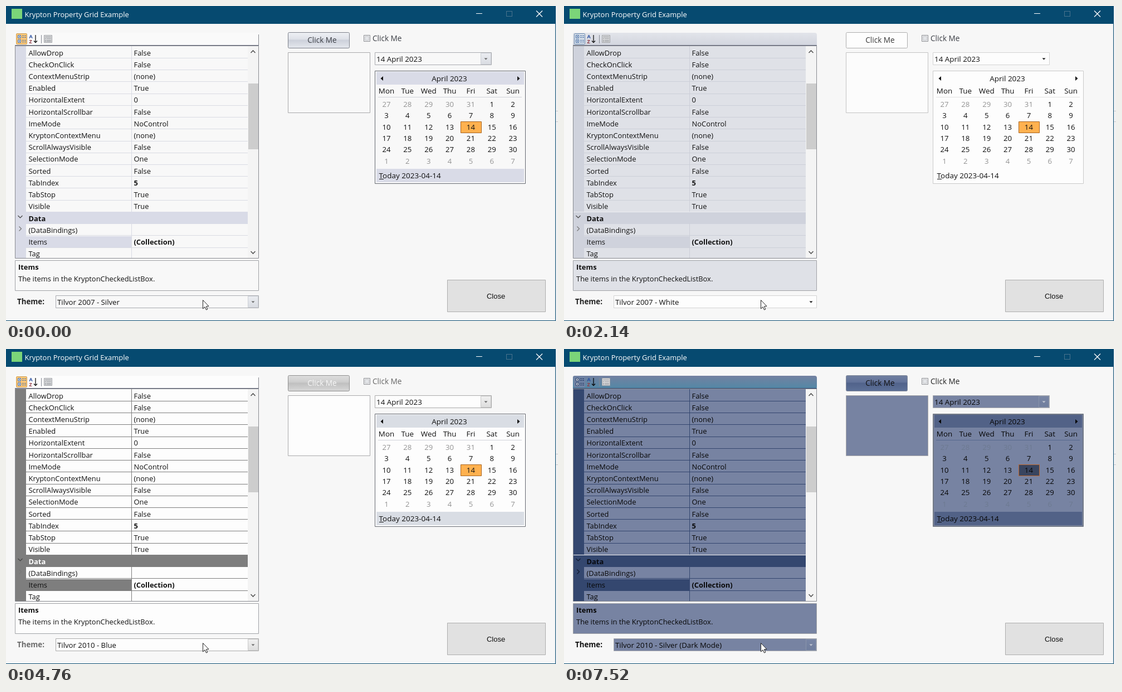
These frames come from a looping animation (991 px wide and 565 px high, 8000 ms). An HTML page with a canvas:

```html
<!DOCTYPE html>
<html lang="en">
<head>
<meta charset="utf-8">
<title>Property Grid Example</title>
<style>
html, body { margin: 0; width: 100%; height: 100%; overflow: hidden; background: #f7f7f7; }
canvas { display: block; width: 991px; height: 565px; }
</style>
</head>
<body>
<canvas id="stage" width="991" height="565"></canvas>
<script>
const ctx = document.getElementById('stage').getContext('2d');
const LOOP = 8000;
const UI = '"Open Sans", "Noto Sans", sans-serif';

// Themes: each one starts from a related theme and overrides what differs.
const silver = {
  bg: '#f8f8f8', line: '#d9dbe3', cat: '#d9dbe7', catLine: '#d9dbe7', text: '#111', catText: '#111', arrow: '#444',
  bar: ['#fafafa', '#fafafa'], flatBar: true, barLine: '#666b7d', iconBg: '#ffc877', iconEdge: '#c79a55', glyph: '#3b659f',
  list: '#f8f8f8', listEdge: '#a9a9ab', combo: '#f8f8f8', comboEdge: '#a9abb0', comboText: '#111',
  drop: ['#eceef2', '#d8dbe1'], dropEdge: '#cdd0d6', dropArrow: '#666',
  button: ['#eff1f5', '#dfe2e9', '#cdd1db', '#e5e8ee'], buttonEdge: '#7d818b', buttonText: '#3b3e45',
  cal: '#f8f8f8', calHead: '#d9dbe7', calEdge: '#666a72', calText: '#111', calDim: '#939393', calLine: '#d0d2d8',
  pick: '#ffb14f', pickEdge: '#a96521', label: '#222', check: '#3b3e45'
};
const silverDark = { ...silver,
  bg: '#7783a2', line: '#34466f', cat: '#34476f', catLine: '#f4f4f4', text: '#070707', catText: '#080a10', arrow: '#111a30',
  bar: ['#7d88a7', '#737f9f'], flatBar: false, barLine: '#34466f', iconBg: '#5288d8', iconEdge: '#2c5598', glyph: '#20355f',
  list: '#7783a2', combo: '#7783a2', comboText: '#070707', drop: ['#a8b3cb', '#687da8'], dropEdge: '#9aa5bd', dropArrow: '#eee',
  button: ['#c9d0df', '#8f9bb6', '#53658d', '#929fbb'], buttonText: '#111', check: '#222',
  cal: '#7783a2', calHead: '#526287', calEdge: '#737a88', calText: '#070707', calDim: '#6d7a91', calLine: '#56678e',
  pick: '#39455f', pickEdge: '#bd672d', label: '#111'
};
const silverLight = { ...silver,
  bg: '#dfe1e7', line: '#cccfd8', cat: '#cfd2dc', catLine: '#edeef2', bar: ['#e2e4ea', '#d2d5de'], flatBar: false,
  iconBg: '#d4dde8', iconEdge: '#6c8bb0', list: '#dfe1e7', combo: '#dfe1e7', cal: '#dfe1e7', calHead: '#cfd2dc'
};
const whiteStart = { ...silverLight,
  list: '#fcfcfc', listEdge: '#c3c3c3', combo: '#fdfdfd', comboEdge: '#d3d3d3', drop: ['#fdfdfd', '#fdfdfd'], dropEdge: '#fdfdfd', dropArrow: '#111',
  button: ['#fdfdfd', '#fdfdfd', '#fdfdfd', '#fdfdfd'], buttonEdge: '#adadad', buttonText: '#3a3a3a',
  cal: '#fdfdfd', calHead: '#fdfdfd', calEdge: '#c9c9c9', calLine: '#e3e3e3'
};
const white = { ...whiteStart, bg: '#fdfdfd', line: '#e1e2e7' };
const blackLight = { ...silver,
  bg: '#fdfdfd', line: '#7e7e7e', cat: '#7e7e7e', catLine: '#7e7e7e', catText: '#fff', bar: ['#fdfdfd', '#fdfdfd'],
  list: '#fdfdfd', combo: '#fdfdfd', comboEdge: '#ababab', drop: ['#f2f2f2', '#dcdcdc'], dropEdge: '#c9c9c9',
  button: ['#dedede', '#cecece', '#c0c0c0', '#d8d8d8'], buttonEdge: '#909090', buttonText: '#f8f8f8',
  cal: '#fdfdfd', calHead: '#d9dde4', label: '#6b6b6b', check: '#666'
};
const black = { ...blackLight,
  bar: ['#e2e4e7', '#b7bbc1'], flatBar: false, buttonText: '#333', buttonEdge: '#777', comboEdge: '#898989', label: '#464646'
};
const blackDark = { ...black,
  bg: '#090909', line: '#292929', cat: '#222', catLine: '#eee', text: '#f7f7f7', catText: '#fff', arrow: '#050505',
  bar: ['#0b0b0b', '#060606'], barLine: '#777', iconBg: '#171b23', iconEdge: '#7890af', glyph: '#b9d2ef',
  list: '#090909', combo: '#090909', comboText: '#f7f7f7', drop: ['#a8a8a8', '#333'], dropEdge: '#747474', dropArrow: '#aaa',
  button: ['#b2b2b2', '#555', '#090909', '#555'], buttonText: '#f7f7f7',
  cal: '#090909', calHead: '#282929', calEdge: '#0b0b0b', calText: '#f7f7f7', calDim: '#515151', calLine: '#343434',
  pick: '#090909', pickEdge: '#ba5b1b', label: '#fff', check: '#fff'
};
const blueLight = { ...silver,
  bg: '#e6eefa', line: '#a8c7ea', cat: '#a8c8ea', catLine: '#edf4fc', text: '#1010e8', catText: '#173985',
  bar: ['#d1e3f7', '#8db7e3'], flatBar: false, barLine: '#7591b3', iconBg: '#d4e3f3', iconEdge: '#587da9',
  list: '#e6eefa', combo: '#e6eefa', comboEdge: '#b1c0d6', comboText: '#1010e8', drop: ['#e6eefa', '#dce8f6'], dropEdge: '#b6c8de', dropArrow: '#8c9cb0',
  button: ['#dce9f8', '#d4e4f5', '#cadef3', '#d9e8f9'], buttonEdge: '#a4b9d4', buttonText: '#1e395b',
  cal: '#e6eefa', calHead: '#d1e2f5', calEdge: '#6f98cc', calLine: '#bcd2eb', pick: '#b4d0ed', pickEdge: '#b86b3a',
  label: '#1e2b45', check: '#1e395b'
};
const blue = { ...blueLight, bg: '#fdfdfd', text: '#111', comboText: '#111', list: '#fdfdfd', combo: '#fdfdfd', cal: '#fdfdfd', pick: '#ffb14f' };
const blueStart = { ...blue, line: '#7e7e7e', cat: '#7e7e7e' };
const silver10 = { ...silver, button: ['#fafbfc', '#f0f2f5', '#e5e8ed', '#eff1f4'], buttonEdge: '#a7abb2', drop: ['#f8f8f8', '#eceef1'] };
const silver10Dark = { ...silverDark,
  bar: ['#7381a1', '#5288a6'], iconBg: '#6f82a4', iconEdge: '#6f82a4',
  drop: ['#7986a5', '#6f7d9d'], dropEdge: '#8a94aa', dropArrow: '#c5cad5',
  button: ['#7180a0', '#63739a', '#51638b', '#5d7097'], buttonEdge: '#858c9b'
};
const blueDark = { ...silver10Dark, comboEdge: '#b1c0d6' };

const a = 'Tilvor 2007 - ', b = 'Tilvor 2010 - ', dark = ' (Dark Mode)', light = ' (Light Mode)';
// The chosen label changes first, the colours follow.
const steps = [
  [0, silver, a + 'Silver'],
  [730, silver, a + 'Silver' + dark], [800, silverDark, a + 'Silver' + dark],
  [1460, silverLight, a + 'Silver' + light],
  [2140, whiteStart, a + 'White'], [2210, white, a + 'White'],
  [2810, white, a + 'Black'], [2880, black, a + 'Black'],
  [3480, black, a + 'Black' + dark], [3550, blackDark, a + 'Black' + dark],
  [4150, blackDark, a + 'Black' + light], [4220, blackLight, a + 'Black' + light],
  [4760, blackLight, b + 'Blue'], [4830, blueStart, b + 'Blue'], [4900, blue, b + 'Blue'],
  [5430, blue, b + 'Blue' + dark], [5500, blueDark, b + 'Blue' + dark],
  [6100, blueDark, b + 'Blue' + light], [6170, blueLight, b + 'Blue' + light],
  [6780, blueLight, b + 'Silver'], [6850, silver10, b + 'Silver'],
  [7450, silver10, b + 'Silver' + dark], [7520, silver10Dark, b + 'Silver' + dark]
];

const rows = `AllowDrop|False
CheckOnClick|False
ContextMenuStrip|(none)
Enabled|True
HorizontalExtent|0
HorizontalScrollbar|False
ImeMode|NoControl
KryptonContextMenu|(none)
ScrollAlwaysVisible|False
SelectionMode|One
Sorted|False
TabIndex|5
TabStop|True
Visible|True
Data|
(DataBindings)|
Items|(Collection)
Tag|`.split('\n').map(r => r.split('|'));

function rect(x, y, w, h, fill) {
  ctx.fillStyle = fill;
  ctx.fillRect(x, y, w, h);
}
function box(x, y, w, h, fill, edge, r = 0) {
  ctx.beginPath();
  ctx.roundRect(x + .5, y + .5, w - 1, h - 1, r);
  ctx.fillStyle = fill;
  ctx.fill();
  ctx.strokeStyle = edge;
  ctx.lineWidth = 1;
  ctx.stroke();
}
function shade(y, h, colors, stops) {
  const g = ctx.createLinearGradient(0, y, 0, y + h);
  colors.forEach((c, i) => g.addColorStop(stops ? stops[i] : i / (colors.length - 1), c));
  return g;
}
function text(s, x, y, color, size = 12.9, { bold = false, align = 'left', family = UI } = {}) {
  ctx.font = `${bold ? 700 : 400} ${size}px ${family}`;
  ctx.textAlign = align;
  ctx.fillStyle = color;
  ctx.fillText(s, x, y);
}
function path(points, stroke, width = 1, fill) {
  ctx.beginPath();
  points.forEach(([x, y], i) => i ? ctx.lineTo(x, y) : ctx.moveTo(x, y));
  if (fill) {
    ctx.closePath();
    ctx.fillStyle = fill;
    ctx.fill();
  }
  if (stroke) {
    ctx.strokeStyle = stroke;
    ctx.lineWidth = width;
    ctx.stroke();
  }
}
function chevron(x, y, dx, dy, color, width = 1.4) {
  // dx, dy give the pointing direction and the half size
  const p = dx ? [[x - dx, y - Math.abs(dx) * 2], [x + dx, y], [x - dx, y + Math.abs(dx) * 2]]
    : [[x - Math.abs(dy) * 2, y - dy], [x, y + dy], [x + Math.abs(dy) * 2, y - dy]];
  path(p, color, width);
}

function drawWindow() {
  rect(0, 0, 991, 565, '#f7f7f7');
  rect(987, 0, 4, 565, '#f1f1f2');
  rect(987, 188, 4, 1, '#c9c9cc');
  rect(987, 207, 4, 1, '#c9c9cc');
  rect(0, 0, 987, 32, '#064a70');
  rect(986, 0, 1, 565, '#064a70');
  rect(0, 564, 987, 1, '#064a70');
  rect(10, 5, 19, 18, '#7bd579');
  text('Krypton Property Grid Example', 33.5, 19.5, '#fff');
  rect(844, 13, 11, 1, '#fff');
  ctx.strokeStyle = '#49738d';
  ctx.lineWidth = 1;
  ctx.strokeRect(898.5, 9.5, 10, 9);
  path([[952, 8.5], [963, 19.5]], '#fff', 1.2);
  path([[963, 8.5], [952, 19.5]], '#fff', 1.2);
  box(792, 491, 177, 58, '#e1e1e1', '#adadad');
  text('Close', 879.5, 524.5, '#111', 13, { align: 'center', family: '"Liberation Sans", Arial, sans-serif' });
}

function drawToolbar(t) {
  if (t.flatBar) {
    rect(16, 48, 438, 23, t.bar[0]);
    rect(453, 51, 1, 20, '#85878d');
  } else {
    ctx.beginPath();
    ctx.roundRect(16, 48, 438, 23, [3, 4, 3, 0]);
    ctx.fillStyle = shade(48, 23, t.bar);
    ctx.fill();
  }
  rect(16, 70, 438, 1, t.barLine);

  box(18, 49, 20, 20, t.iconBg, t.iconEdge, 1);
  for (const y of [52, 60]) {
    box(21, y, 6, 6, '#f6f8fb', t.glyph);
    rect(23, y + 2, 2, 2, t.glyph);
    for (const d of [1, 4]) {
      rect(29, y + d, 3, 1, t.glyph);
      rect(33, y + d, 3, 1, t.glyph);
    }
  }
  const isDark = t === blackDark;
  const ink = t.text === '#1010e8' ? '#222' : t.text;
  text('A', 41.5, 58, isDark ? '#9db8dd' : '#294fa0', 9, { bold: true });
  text('Z', 41.5, 67, isDark ? '#b9a0a0' : '#923d48', 9, { bold: true });
  path([[53, 52], [53, 65]], ink, 1.3);
  chevron(53, 64, 0, 1.5, ink, 1.3);
  rect(63, 52, 1, 15, isDark ? '#ddd' : '#858993');
  box(68, 52, 15, 14, isDark ? '#777' : '#d9dadc', '#a2a4a8');
  rect(70, 55, 11, 1, '#909398');
  for (const y of [58, 61, 63]) {
    rect(70, y, 2, 1, '#888c92');
    rect(73, y, 8, 1, '#999ca1');
  }
}

function drawGrid(t) {
  box(16, 71, 438, 382, t.bg, '#898b91');
  rect(17, 72, 19, 380, t.cat);
  ctx.save();
  ctx.beginPath();
  ctx.rect(17, 72, 417, 380);
  ctx.clip();
  rows.forEach(([name, value], i) => {
    const top = Math.round(73 + i * 21.22), base = Math.round(88.5 + i * 21.22);
    const isCat = name === 'Data', isPick = name === 'Items';
    if (isCat) {
      rect(17, top, 417, 21, t.cat);
      rect(17, top - 1, 417, 1, t.catLine);
    } else {
      if (isPick) rect(36, top, 190, 21, t.cat);
      rect(36, top + 20, 398, 1, t.line);
      rect(225, top - 1, 1, 22, t.line);
    }
    text(name, 40.5, base, isCat ? t.catText : t.text, 12.9, { bold: isCat });
    text(value, 229.5, base, t.text, 12.9, { bold: value === '5' || isPick });
  });
  chevron(25.5, 378, 0, 2, t.arrow, 1.2);
  chevron(25.5, 399.5, 2, 0, t.arrow === '#444' ? '#777' : t.arrow, 1.2);
  ctx.restore();

  rect(434, 72, 19, 380, '#f4f4f4');
  rect(435, 139, 18, 118, '#cdcdcd');
  chevron(443.5, 82, 0, -2, '#555', 1.6);
  chevron(443.5, 442, 0, 2, '#555', 1.6);

  box(16, 456, 438, 55, t.bg, '#a0a2a6');
  text('Items', 22, 473, t.text, 12.9, { bold: true });
  text('The items in the KryptonCheckedListBox.', 22, 494, t.text);
}

function drawCombo(t, x, y, w, label, size) {
  box(x, y, w, 23, t.combo, t.comboEdge);
  box(x + w - 20, y + 1, 19, 21, shade(y, 23, t.drop), t.dropEdge);
  const cx = x + w - 10.5, cy = y + 10.5;
  path([[cx - 3, cy], [cx + 3, cy], [cx, cy + 3]], null, 0, t.dropArrow);
  text(label, x + 3, y + 16.5, t.comboText, size);
}

function drawCalendar(t) {
  box(662, 116, 271, 203, t.cal, t.calEdge);
  if (t.calText !== '#111' && t !== blackDark) {
    ctx.strokeStyle = t.calEdge;
    ctx.strokeRect(663.5, 117.5, 268, 200);
  }
  rect(665, 118, 265, 23, t.calHead);
  rect(665, 292, 265, 24, t.calHead);
  path([[677, 126], [677, 134], [672.5, 130]], null, 0, t.calText);
  path([[918, 126], [918, 134], [922.5, 130]], null, 0, t.calText);
  const mid = { align: 'center' };
  const colX = i => 683 + 37.85 * i;
  text('April 2023', 796, 134.5, t.calText, 13.5, mid);
  ['Mon', 'Tue', 'Wed', 'Thu', 'Fri', 'Sat', 'Sun'].forEach((d, i) => text(d, colX(i), 157, t.calText, 13.4, mid));
  rect(668, 163, 258, 1, t.calLine);
  box(816, 207, 38, 21, t.pick, t.pickEdge);
  // The sheet starts on 27 March
  for (let i = 0; i < 42; i++) {
    const n = i - 4, inside = n > 0 && n <= 30;
    const day = n < 1 ? n + 31 : n > 30 ? n - 30 : n;
    text(day, colX(i % 7), 181 + 20.3 * Math.floor(i / 7), inside ? t.calText : t.calDim, 13.2, mid);
  }
  text('Today 2023-04-14', 669.5, 308.5, t.calText, 13.5);
  rect(670, 310, 8, 1, t.calText);
}

function drawControls(t, label) {
  box(506, 47, 111, 29, shade(47, 29, t.button, [0, .42, .5, 1]), t.buttonEdge, 2);
  text('Click Me', 567.5, 65.5, t.buttonText, 13.6, { align: 'center' });
  box(642, 52, 12, 12, '#f5f5f6', '#8c8e93');
  box(644, 54, 8, 8, '#e3e5e8', '#c2c4c8');
  text('Click Me', 658, 63, t.check, 13.6);
  box(506, 83, 148, 109, t.list, t.listEdge);
  drawCombo(t, 662, 83, 210, '14 April 2023', 13.4);
  drawCalendar(t);
  text('Theme:', 20, 535, t.label, 13.3, { bold: true });
  drawCombo(t, 89, 519, 365, label, 13.2);
}

function drawPointer() {
  path([[353.5, 527.5], [353.5, 543], [357, 539.7], [359.5, 545], [361.8, 544], [359.4, 538.8], [364, 538.5]], '#222', 1, '#fff');
}

function frame() {
  const time = performance.now() % LOOP;
  const [, theme, label] = steps.findLast(s => s[0] <= time);
  drawWindow();
  drawToolbar(theme);
  drawGrid(theme);
  drawControls(theme, label);
  drawPointer();
  requestAnimationFrame(frame);
}
frame();
</script>
</body>
</html>
```
